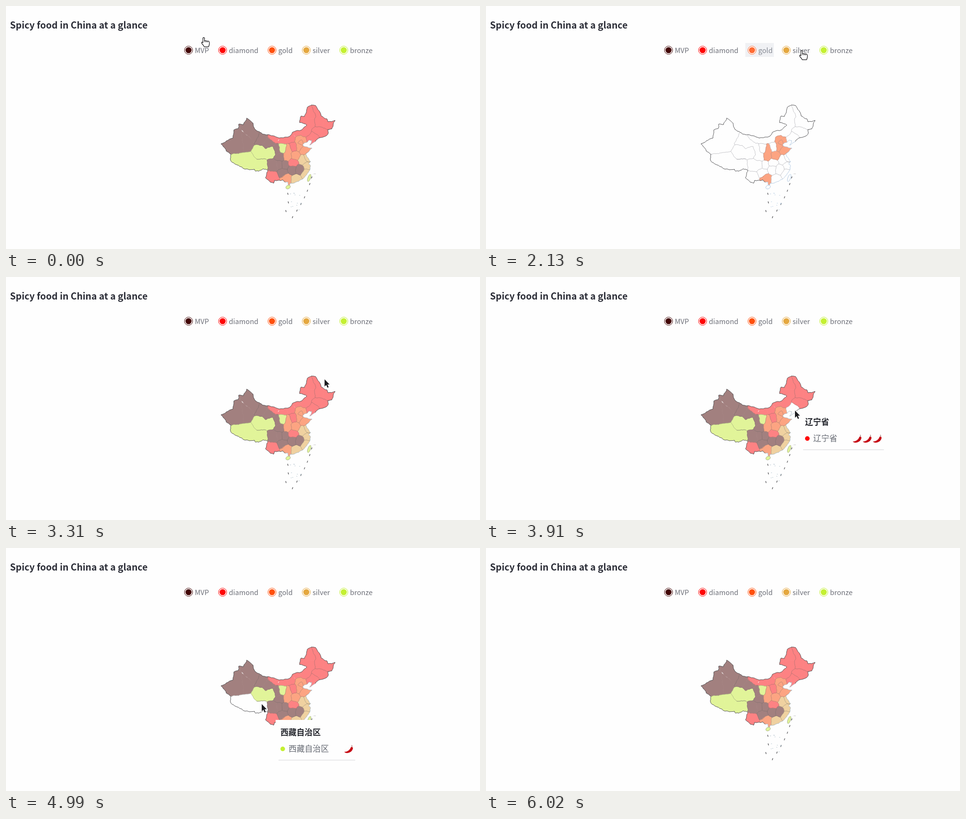
These frames come from a looping animation (988x506 px, 6.37 s). An HTML page with a canvas:

```html
<!DOCTYPE html>
<html lang="en">
<head>
<meta charset="utf-8">
<title>Spicy food map</title>
<style>
html, body { margin: 0; width: 100%; height: 100%; overflow: hidden; background: #fefefe; }
canvas { display: block; }
</style>
</head>
<body>
<canvas id="stage" width="988" height="506"></canvas>
<script>
const ctx = document.getElementById('stage').getContext('2d');
const LOOP = 6370, FIRST_TICK = 224, TICK = 118.2, LAST_TICK = 48;
const FONT = '"Noto Sans CJK SC", "Noto Sans CJK JP", "Noto Sans", sans-serif';
const PAPER = '#fefefe';

const tier = (name, color, muted, fill, peppers, x, right) => ({ name, color, muted, fill, peppers, x, right });
const tiers = [
  tier('MVP', '#430505', '#642c2c', '#a2807f', 5, 380.5, 425.5),
  tier('diamond', '#ff0505', '#ff3a3a', '#fd8283', 3, 451.5, 527.5),
  tier('gold', '#ff500c', '#ff6c34', '#fca482', 2, 554.5, 600),
  tier('silver', '#e5a840', '#ebba66', '#efd1a0', 2, 626, 678),
  tier('bronze', '#c4f032', '#d0f35c', '#e1f499', 1, 704, 766.5)
];
const [MVP, DIAMOND, GOLD, SILVER, BRONZE] = tiers;

const points = text => text.split(',').map(p => {
  const [x, y] = p.trim().split(' ').map(Number);
  return { x, y };
});

// Fractal wiggle from a up to b; the same line results in either direction
function wiggle(a, b) {
  const dx = b.x - a.x, dy = b.y - a.y, len = Math.hypot(dx, dy);
  if (len < 4) return [a];
  const hash = Math.sin((a.x + b.x) * 12.9 + (a.y + b.y) * 78.2) * 437;
  const side = dx < 0 || (dx === 0 && dy < 0) ? -1 : 1;
  const bend = (hash - Math.floor(hash) - 0.5) * side * Math.min(0.25, 2.4 / len);
  const mid = { x: (a.x + b.x) / 2 - dy * bend, y: (a.y + b.y) / 2 + dx * bend };
  return [...wiggle(a, mid), ...wiggle(mid, b)];
}
function addLine(path, list) {
  list.forEach((p, i) => i ? path.lineTo(p.x, p.y) : path.moveTo(p.x, p.y));
}
const wiggleAll = list => list.flatMap((p, i) => i + 1 < list.length ? wiggle(p, list[i + 1]) : [p]);

const north = wiggleAll(points(`448 287,459 281,473 275,475 258,484 255,485 246,495 247,502 233,515 244,519 257,
  536 267,556 270,570 275,592 271,597 263,616 258,627 248,612 243,615 229,622 230,628 211,637 206,645 207,657 229,
  669 235,671 241,686 238,682 248,679 256,671 257,672 264,668 270,655 274,645 282`));
const coast = wiggleAll(points(`645 282,633 290,637 280,632 279,619 288,619 291,624 293,638 296,625 308,631 318,
  635 324,631 329,635 333,634 339,625 353,617 361,602 368,592 369,591 373,588 372,588 367,582 367`));
const south = wiggleAll(points(`582 367,577 362,567 363,560 363,558 369,551 367,541 358,546 343,536 339,527 344,
  520 344,518 340,507 341,496 339,477 329,468 321,469 309,459 302,453 293,448 287`));
const [landLine, seaLine, land] = [[north, south], [coast], [[...north, ...coast, ...south]]].map(lists => {
  const path = new Path2D();
  lists.forEach(l => addLine(path, l));
  return path;
});

// Each region owns the ground nearest to its seeds
const seeds = [];
function region(tier, name, text) {
  const r = { tier, name };
  for (const p of points(text)) seeds.push({ ...p, region: r });
}
region(MVP, '新疆维吾尔自治区', '488 288,500 286,518 268');
region(BRONZE, '西藏自治区', '494 324,506 322,530 334');
region(BRONZE, '青海省', '530 304,553 303');
region(MVP, '甘肃省', '532 276,548 286,565 300,572 314');
region(DIAMOND, '内蒙古自治区', '560 272,578 277,594 275,607 264,622 264,634 243,633 226');
region(BRONZE, '宁夏回族自治区', '577 297');
region(MVP, '四川省', '560 332,570 331');
region(MVP, '重庆市', '581 331');
region(DIAMOND, '云南省', '556 356');
region(MVP, '贵州省', '578 346');
region(GOLD, '广西壮族自治区', '585 359');
region(SILVER, '广东省', '606 361');
region(MVP, '湖南省', '597 340');
region(MVP, '江西省', '612 341');
region(SILVER, '福建省', '625 349');
region(SILVER, '浙江省', '629 333');
region(SILVER, '安徽省', '619 320');
region(SILVER, '江苏省', '629 315');
region(DIAMOND, '湖北省', '598 327');
region(GOLD, '河南省', '603 311');
region(GOLD, '陕西省', '586 313,588 299');
region(DIAMOND, '山西省', '599 294');
region(GOLD, '河北省', '611 293,612 278,620 281');
region(GOLD, '北京市', '616 283');
region(GOLD, '山东省', '621 300');
region(DIAMOND, '辽宁省', '633 279,642 275');
region(DIAMOND, '吉林省', '652 262,664 266');
region(DIAMOND, '黑龙江省', '654 242,670 246,651 218');

// Cuts a cell down to the side that lies nearer to seed than to other
function cut(cell, seed, other) {
  const gain = p => (p.x - other.x) ** 2 + (p.y - other.y) ** 2 - (p.x - seed.x) ** 2 - (p.y - seed.y) ** 2;
  return cell.flatMap((a, i) => {
    const b = cell[(i + 1) % cell.length], ga = gain(a), gb = gain(b), kept = ga >= 0 ? [a] : [];
    if (ga >= 0 !== gb >= 0) {
      const u = ga / (ga - gb);
      kept.push({ x: a.x + (b.x - a.x) * u, y: a.y + (b.y - a.y) * u, across: ga >= 0 ? other : a.across });
    }
    return kept;
  });
}
const grain = new Path2D();
for (const seed of seeds) {
  let cell = points('430 190,700 190,700 390,430 390');
  for (const other of seeds) if (other !== seed) cell = cut(cell, seed, other);
  seed.path = new Path2D();
  addLine(seed.path, wiggleAll([...cell, cell[0]]));
  seed.path.closePath();
  cell.forEach((p, i) => {
    if (!p.across || p.across.region === seed.region || p.across.x < seed.x) return;
    addLine(grain, wiggleAll([p, cell[(i + 1) % cell.length]]));
  });
}

const islands = [[588, 377, 5, 3.6, -0.5], [632, 358, 2.8, 8, 0.35]].map(shape => {
  const path = new Path2D();
  path.ellipse(...shape, 0, 7);
  return path;
});
const dashes = new Path2D();
for (let i = 0; i < 7; i++) {
  const x = 638 - 40 * i / 6 + 5 * Math.sin(Math.PI * i / 6), y = 355 + 13.8 * i;
  addLine(dashes, [{ x, y }, { x: x - 1.5, y: y + 4 }]);
}
for (let i = 0; i < 3; i++) {
  const x = 587 + 4 * i - 3 * i * i, y = 389 + 18 * i;
  addLine(dashes, [{ x, y }, { x: x + 1, y: y + 4 }]);
}
const random = n => Math.abs(Math.sin(n * 91.7) * 5371) % 1;
const reefs = Array.from({ length: 14 }, (_, i) => [591 + 28 * random(i + 1), 388 + 38 * random(i + 40)]);

// Pointer route: tick, x, y
const route = [[-1, 412, 65], [1, 409, 77], [2, 407, 99], [4, 407, 97], [7, 407, 97], [8, 451, 94], [11, 455, 95],
  [13, 534, 95], [15, 596, 94], [16, 658, 92], [18, 660, 93], [20, 684, 94], [21, 725, 95], [23, 757, 97],
  [24, 745, 120], [26, 664, 213], [28, 640, 245], [29, 629, 249], [30, 641, 271], [31, 644, 278], [37, 585, 345],
  [38, 543, 347], [39, 541, 337], [40, 533, 325], [42, 508, 280], [43, 500, 270], [48, 918, 480]];

function pointerAt(tick) {
  const next = route.findIndex(stop => stop[0] > tick);
  if (tick < 0 || next < 0) {
    const [, x, y] = route.at(tick < 0 ? 0 : -1);
    return { x, y };
  }
  const [t0, x0, y0] = route[next - 1], [t1, x1, y1] = route[next];
  const u = (tick - t0) / (t1 - t0);
  return { x: x0 + (x1 - x0) * u, y: y0 + (y1 - y0) * u };
}
function targetAt({ x, y }) {
  if (y > 79 && y < 98) return { tier: tiers.find(t => x > t.x - 14 && x < t.right) };
  if (!ctx.isPointInPath(land, x, y)) return {};
  const distance = s => Math.hypot(s.x - x, s.y - y);
  return { region: seeds.reduce((a, b) => distance(a) < distance(b) ? a : b).region };
}

const handPath = new Path2D('M-1.4 1.5Q0-.3 1.6 1.5V7Q3 6 4.3 7.2Q5.8 6.3 7 7.7Q9.2 7 10.3 8.6L11 12Q10.6 15 9.4 18H1Q0 15.4-3.4 12Q-4.7 10-3.4 9.3Q-2.5 9.2-1.4 10.6Z');
const knuckles = new Path2D('M1.6 7V9.5M4.3 7.4V9.8M7 7.8V10');
const arrowPath = new Path2D('M0 0V15L3.5 11.8L6 17.5L8.5 16.5L6 10.8H10.5Z');
const pepperPath = new Path2D('M0 14.4C7 14.6 11.6 11 14 4.6Q16.6 3.4 18.2 6C18 12 12.5 17.2 5 17Q1.5 16.6 0 14.4Z');
const stemPath = new Path2D('M16.2 4.4Q16.8 2.2 15.4 .6');

function text(str, x, y, font, color) {
  ctx.font = font + ' ' + FONT;
  ctx.fillStyle = color;
  ctx.fillText(str, x, y);
}
function fill(path, color) {
  ctx.fillStyle = color;
  ctx.fill(path);
}
function line(path, color, width) {
  ctx.strokeStyle = color;
  ctx.lineWidth = width;
  ctx.stroke(path);
}
function circle(x, y, r) {
  const path = new Path2D();
  path.arc(x, y, r, 0, 7);
  return path;
}

function drawLegend(active) {
  for (const t of tiers) {
    const on = t === active, color = on ? t.muted : t.color;
    if (on) {
      ctx.fillStyle = '#f0f1f4';
      ctx.fillRect(t.x - 14, 77, t.right - t.x + 14, 29);
    }
    const ring = circle(t.x, 92, 8.5);
    fill(ring, '#fff');
    line(ring, color, 1);
    fill(circle(t.x, 92, 6.3), color);
    text(t.name, t.x + 13, 98, '14.6px', on ? '#868a93' : '#6e7079');
  }
}

function drawMap(hover) {
  const fillOf = r => {
    const blank = hover.tier ? r.tier !== hover.tier : r === hover.region;
    return blank ? PAPER : r.tier.fill;
  };
  const sea = hover.tier ? '#a5c1dd' : '#9fb2bf';
  ctx.lineJoin = 'round';
  ctx.save();
  ctx.clip(land);
  for (const seed of seeds) {
    fill(seed.path, fillOf(seed.region));
    line(seed.path, fillOf(seed.region), 0.7);
  }
  line(grain, hover.tier ? 'rgba(120,120,130,.6)' : 'rgba(90,90,90,.5)', 0.7);
  ctx.restore();
  line(seaLine, sea, 0.8);
  line(landLine, '#444448', 0.9);
  for (const island of islands) {
    fill(island, fillOf({ tier: BRONZE }));
    line(island, hover.tier ? sea : '#a3ac86', 0.9);
  }
  line(dashes, '#4a4a4e', 1.2);
  ctx.fillStyle = sea;
  for (const [x, y] of reefs) ctx.fillRect(x, y, 1.4, 1);
  ctx.fillStyle = '#bbb';
  ctx.fillRect(641, 349, 5, 0.7);
}

function drawTooltip({ name, tier }, x, y) {
  const peppersX = x + 59 + name.length * 16.8;
  const width = peppersX + tier.peppers * 21 + 9 - x;
  ctx.fillStyle = PAPER;
  ctx.fillRect(x, y, width, 84);
  ctx.fillStyle = '#dedee0';
  ctx.fillRect(x + 6, y + 83, width - 13, 1.3);
  text(name, x + 10, y + 32, 'bold 16.8px', '#25272e');
  fill(circle(x + 14.8, y + 60.3, 4.8), tier.color);
  text(name, x + 27, y + 65.5, '16.8px', '#666a73');
  for (let i = 0; i < tier.peppers; i++) {
    ctx.save();
    ctx.translate(peppersX + i * 21, y + 52);
    fill(pepperPath, '#c60d16');
    line(stemPath, '#a56b68', 1.3);
    ctx.restore();
  }
}

function drawPointer(p) {
  ctx.save();
  ctx.translate(p.x, p.y);
  if (p.y < 125 || targetAt(p).region) {
    ctx.scale(1.1, 1.1);
    fill(handPath, '#fff');
    line(handPath, '#17171a', 1.1);
    line(knuckles, '#17171a', 0.8);
  } else {
    line(arrowPath, '#fff', 2);
    fill(arrowPath, '#1c1c20');
  }
  ctx.restore();
}

// The chart reacts one tick after the pointer, and the tooltip trails it
function draw(now) {
  const tick = Math.max(-1, Math.floor((now % LOOP - FIRST_TICK) / TICK));
  const last = pointerAt(tick - 1), older = pointerAt(tick - 2);
  const hover = targetAt(last);
  ctx.fillStyle = PAPER;
  ctx.fillRect(0, 0, 988, 506);
  text('Spicy food in China at a glance', 8.3, 47, 'bold 19.3px', '#2c2e38');
  drawLegend(hover.tier);
  drawMap(hover);
  if (hover.region) drawTooltip(hover.region, (last.x + older.x) / 2 + 20, (last.y + older.y) / 2 + 16);
  if (tick <= LAST_TICK) drawPointer(pointerAt(tick));
}

const start = performance.now();
function loop() {
  draw(performance.now() - start);
  requestAnimationFrame(loop);
}
loop();
</script>
</body>
</html>
```
